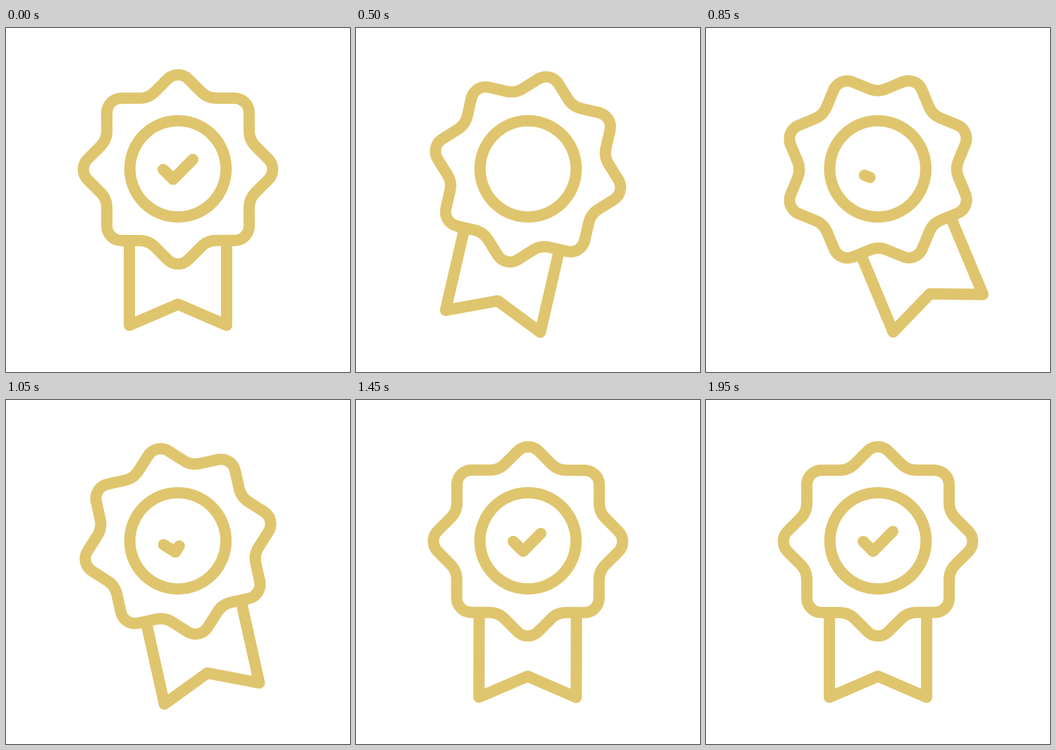
An HTML page without scripts for the animation above (2 s loop, 640 by 640 pixels).

```html
<!DOCTYPE html>
<html lang="en">
<head>
<meta charset="utf-8">
<title>Award badge</title>
<style>
  html, body { margin: 0; width: 100%; height: 100%; overflow: hidden; background: #fff; }
  svg { display: block; width: 100%; height: 100%; }
  .badge {
    fill: none;
    stroke: #dfc56d;
    stroke-width: 21;
    stroke-linecap: round;
    stroke-linejoin: round;
    transform-origin: 320px 263px;
    animation: swing 2s cubic-bezier(.333, 0, .667, 1) infinite;
  }
  .tick {
    stroke-dasharray: 100 200;
    animation: draw 2s infinite, blink 2s step-end infinite;
  }
  /* damped pendulum */
  @keyframes swing {
    0%, 5% { transform: rotate(0deg); }
    25% { transform: rotate(13deg); }
    45% { transform: rotate(-24.2deg); }
    62.5% { transform: rotate(5.1deg); }
    80% { transform: rotate(-3deg); }
    97.5%, 100% { transform: rotate(0deg); }
  }
  @keyframes draw {
    0% { stroke-dashoffset: 0; animation-timing-function: cubic-bezier(.33, 0, .4, 1); }
    17.5% { stroke-dashoffset: 100; }
    32.5% { stroke-dashoffset: 100; animation-timing-function: cubic-bezier(.3, 0, .33, 1); }
    87.5%, 100% { stroke-dashoffset: 0; }
  }
  /* hides the round cap of the empty stroke */
  @keyframes blink {
    0% { visibility: visible; }
    17.5% { visibility: hidden; }
    32.6%, 100% { visibility: visible; }
  }
</style>
</head>
<body>
<svg viewBox="0 0 640 640">
  <defs>
    <path id="lobe" d="M-19.1 -168.1A27 27 0 0 1 19.1 -168.1L43.1 -144.1A40 40 0 0 0 71.4 -132.4H105.4"/>
    <g id="pair">
      <use href="#lobe"/>
      <use href="#lobe" transform="rotate(45)"/>
    </g>
  </defs>
  <g class="badge">
    <path d="M229.5 396V553L320 514L410.5 553V396"/>
    <g transform="translate(320 263)">
      <use href="#pair"/>
      <use href="#pair" transform="rotate(90)"/>
      <use href="#pair" transform="rotate(180)"/>
      <use href="#pair" transform="rotate(270)"/>
    </g>
    <circle cx="320" cy="262" r="89.5"/>
    <path class="tick" pathLength="100" d="M292.5 263.2L311 281.5L347.5 244.5"/>
  </g>
</svg>
</body>
</html>
```
